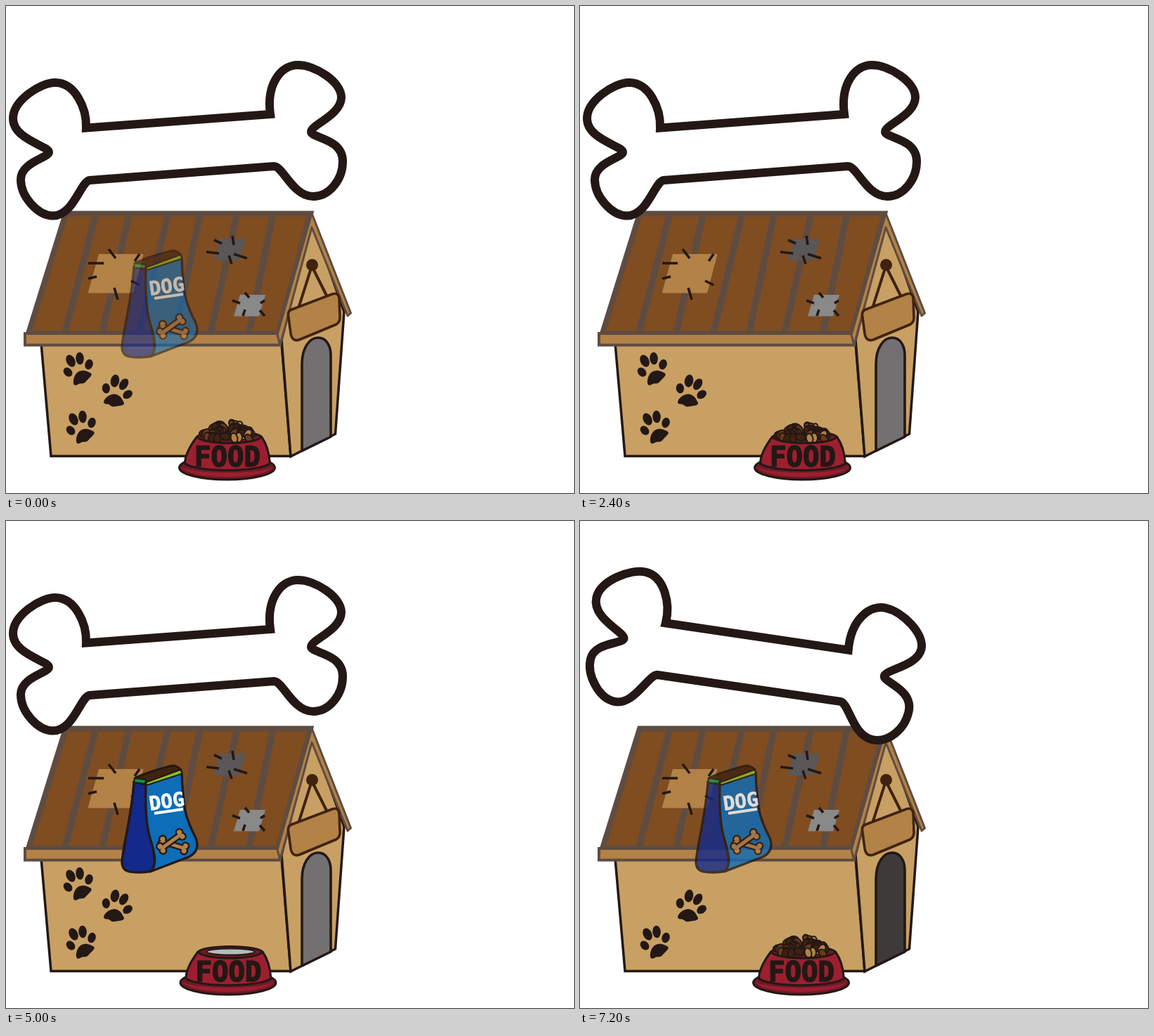
These frames come from a looping animation (808 px wide and 693 px high, 7400 ms). An HTML page with a canvas:

```html
<!DOCTYPE html>
<html lang="en">
<head>
<meta charset="utf-8">
<title>Dog house</title>
<style>
html, body { margin: 0; width: 100%; height: 100%; overflow: hidden; background: #fff; }
canvas { display: block; }
</style>
</head>
<body>
<canvas id="stage" width="808" height="693"></canvas>
<script>
const LOOP = 7400, W = 808, H = 693;
const INK = '#231815', WALL = '#c8a063', TAN = '#b28247', ROOF = '#804d21',
  TRIM = '#5f4c41', DARK = '#40220f', BROWN = '#6a3b1a', RED = '#9c1f30', WINE = '#6f1a25';
const stage = document.getElementById('stage').getContext('2d');
const layer = document.createElement('canvas');
layer.width = W;
layer.height = H;
const bagCtx = layer.getContext('2d');

function shape(c, d, fill, stroke, width = 3, join = 'round') {
  const p = new Path2D(d);
  c.lineJoin = join;
  c.lineCap = 'butt';
  if (fill) { c.fillStyle = fill; c.fill(p); }
  if (stroke) { c.strokeStyle = stroke; c.lineWidth = width; c.stroke(p); }
}

function oval(c, x, y, rx, ry, turn, fill, stroke, width = 3) {
  c.beginPath();
  c.ellipse(x, y, rx, ry, turn * Math.PI / 180, 0, 7);
  if (fill) { c.fillStyle = fill; c.fill(); }
  if (stroke) { c.strokeStyle = stroke; c.lineWidth = width; c.stroke(); }
}

function placed(c, x, y, turn, draw) {
  c.save();
  c.translate(x, y);
  c.rotate(turn * Math.PI / 180);
  draw();
  c.restore();
}

// Text centred on the current origin.
function label(c, text, size, colour, weight) {
  c.font = `bold ${size}px "DejaVu Sans Mono", "Noto Sans Mono", monospace`;
  c.textAlign = 'center';
  const m = c.measureText(text);
  const base = (m.actualBoundingBoxAscent - m.actualBoundingBoxDescent) / 2;
  c.fillStyle = c.strokeStyle = colour;
  c.lineWidth = weight;
  c.lineJoin = 'round';
  c.fillText(text, 0, base);
  c.strokeText(text, 0, base);
}

function seeded(seed) {
  return () => (seed = (seed * 16807) % 2147483647) / 2147483647;
}

function kibble(c, x, y, turn, colour) {
  oval(c, x, y, 7, 4.8, turn, colour, INK, 2);
}

function drawRoof(c) {
  shape(c, 'M83 296 H433 L387 467 H31 Z', ROOF);
  const planks = [[127.5, 83.5], [175, 136.5], [230.5, 189.5], [276, 240.5], [328.5, 291], [379.5, 345.5]];
  for (const [a, b] of planks) shape(c, `M${a} 297 L${b} 466`, null, TRIM, 9.5);
  shape(c, 'M85 295.500 H433 L387 466 H32 Z', null, TRIM, 8, 'miter');
  shape(c, 'M132 353 H195.500 L181 408.500 H116.500 Z', TAN);
  shape(c, 'M304 331 H341 L332 362 H296 Z', '#595757');
  shape(c, 'M333 411 H369 L360 441.500 H324 Z', '#898989');
  shape(c, `M146 346 L156 359 M190 353 L183 363 M117 366 H139 M117 388 L129 385
    M178 391 L190 397 M154 401 L159 418 M296 333 L307 338 M322 327 L324 340
    M285 350 L303 352 M317 355 L321 367 M324 353 L343 359 M340 408 L346 415
    M322 419 L333 423 M362 423 L368 419 M361 433 L368 441 M340 432 L337 441`, null, INK, 3.6);
}

function drawHouse(c, doorOpen) {
  shape(c, 'M50 480 H392 L405 640.500 H64 Z', WALL, INK, 3.5, 'miter');
  shape(c, 'M435 306 L481 435 L468.500 609 L405 641 L392 475 Z', WALL, INK, 3.5, 'miter');
  drawRoof(c);
  shape(c, 'M27 466 H387 L390 482.500 H27 Z', TAN, TRIM, 4, 'miter');
  shape(c, 'M435 295 L490.500 437 L486 441 L435 315 L390 482 L386 468 Z', TAN, TRIM, 3);
  shape(c, 'M435 370 L416 430 M435 370 L458 416', null, DARK, 4);
  oval(c, 435.5, 368.5, 8.5, 8.5, 0, DARK);
  shape(c, `M406 432 Q401 434 401.500 440 L405 466 Q407 478 417 475 L470 453
    Q475 450 475 443 L474 415 Q472 407 464 410 Z`, TAN, DARK, 3.6);
  shape(c, 'M421 633 V510 C421 486 432 472 444 472 C456 472 462 484 462 497 V613 Z',
    doorOpen ? '#3e3a39' : '#727071', INK, 3.6);
}

function paw(c, x, y, turn) {
  placed(c, x, y, turn, () => {
    oval(c, -17, 5, 5.6, 7.2, -42, INK);
    oval(c, -13, -11, 6.2, 9, -25, INK);
    oval(c, 0, -14.5, 5.8, 8.8, -4, INK);
    oval(c, 13, -6, 5.6, 7.4, 18, INK);
    shape(c, `M-9 21 C-10 14 -6 4 2 3 C9 2 11 5 15 6 C20 9 13 13 9 18
      C5 23 2 20 -2 22 C-5 24 -8 25 -9 21 Z`, INK);
  });
}

function drawPaws(c, phase) {
  if (phase === 0) paw(c, 105, 516, 0);
  if (phase !== 1) paw(c, 159, 550, 36);
  paw(c, 109, 599, 0);
}

const BONE = `M114 173.500 L376 154 C370 110 392 84 415 84 C440 84 477 108 477 130
  C477 155 434 169 434 179 C434 188 479 188 479 221 C479 247 460 271 437 271
  C408 271 394 228 381 228 L119 248 C106 250 96 298.500 67 298.500 C45 298.500 21 271 21 247
  C21 222 61 216 61 208 C61 199 10 190 10 160 C10 135 48 109 70 109
  C98 109 115 145 114 173.500 Z`;
const POSES = [[0, 0, 0], [1, 0, 12.65], [0, 0, 0], [-0.5, 0.3, -18.2]];

function drawBone(c, slot) {
  const [dx, dy, turn] = POSES[slot % 4];
  placed(c, 245 + dx, 190 + dy, turn, () => {
    c.translate(-245, -190);
    shape(c, BONE, '#fff', INK, 12, 'miter');
  });
}

function drawHeap(c, level) {
  const rnd = seeded(4711), bits = [];
  for (let i = 0; i < 44; i++) {
    const u = rnd() * 2 - 1, v = rnd();
    const tint = [DARK, DARK, BROWN, TAN][Math.floor(rnd() * 3 + (u > 0 ? 0.9 : 0.2))];
    bits.push([317 + u * 34, 619 - 25 * level * (1 - u * u * 0.55) * Math.sqrt(v), rnd() * 180, tint]);
  }
  bits.sort((a, b) => a[1] - b[1]);
  for (const b of bits) kibble(c, ...b);
}

const FALL = [[311, 533], [312, 546], [330, 550], [319, 554], [314, 563], [331, 562], [322, 568],
  [333, 569], [323, 579], [312, 580], [318, 589], [331, 589], [309, 592], [320, 601], [331, 600],
  [310, 604], [326, 610]];

function drawStream(c, count, step) {
  FALL.slice(0, count).forEach(([x, y], i) => {
    const j = i + step, tint = j * j % 5 < 2 ? (j % 2 ? BROWN : DARK) : TAN;
    kibble(c, x + (step % 2) * (i % 2 ? 3 : -2), y, j * 67 % 180, tint);
  });
}

function drawBowl(c, level, falling, step) {
  c.save();
  c.translate(level === 1 ? -1.5 : level > 0 ? 0.5 : 0, 0);
  oval(c, 316, 657, 68, 17, 0, WINE, INK, 3);
  shape(c, 'M250 655 C262 675 370 675 382 655 C370 667 262 667 250 655 Z', RED);
  oval(c, 319, 614, 46, 8.5, 0, WINE, INK, 3);
  oval(c, 319.5, 613, 34, 4.5, 0, '#b5bcbc', INK, 2);
  if (level) drawHeap(c, level);
  if (falling) drawStream(c, falling, step);
  shape(c, `M273 613 C264 625 256 638 256 651 C273 664 359 664 377 651
    C376 638 373 624 365 613 C357 625 281 625 273 613 Z`, RED, INK, 3);
  placed(c, 316.5, 640, 0, () => label(c, 'FOOD', 39, INK, 1.6));
  c.restore();
}

function smallBone(c, x, y, turn, half) {
  placed(c, x, y, turn, () => {
    for (const [grow, tint] of [[2.4, INK], [0, TAN]]) {
      c.fillStyle = tint;
      c.fillRect(-half, -2.4 - grow, half * 2, 4.8 + grow * 2);
      for (const sx of [-half, half])
        for (const sy of [-3.6, 3.6]) oval(c, sx, sy, 3.6 + grow, 3.6 + grow, 0, tint);
    }
  });
}

function drawBag(c) {
  shape(c, 'M183 366 C195 360 225 350 238 348 Q244 349 249 354 L200 374 Z', DARK, INK, 3);
  shape(c, `M182 371 C179 420 165 468 165 487 C166 499 176 500 189 500
    C200 500 210 498 212 494 C212 460 198 435 199 375 Z`, '#13298b', INK, 3.4);
  shape(c, `M199 374 L250 358 C252 412 256 424 270 451 C275 465 270 473 260 478
    L205 499 C218 489 209 466 204 448 C198 425 198 400 199 374 Z`, '#0d6db9', INK, 3.4);
  shape(c, 'M199 372 L248 354 Q251 357 249 360 L200 376 Z', '#8fc31f', INK, 2);
  shape(c, 'M183 366 L199 368 L198 374 L182 372 Z', '#109447', INK, 2);
  placed(c, 228.5, 398, -8, () => label(c, 'DOG', 28, '#fff', 0.6));
  shape(c, 'M211 416 L252 410', null, '#fff', 4);
  smallBone(c, 238, 461, 17, 17);
  smallBone(c, 235, 456, -36, 17);
}

function placeBag(c, alpha, tilt) {
  if (alpha <= 0) return;
  bagCtx.clearRect(0, 0, W, H);
  placed(bagCtx, 218 + 51 * tilt, 424 + 50.5 * tilt, 124 * tilt, () => {
    bagCtx.translate(-218, -424);
    drawBag(bagCtx);
  });
  c.globalAlpha = alpha;
  c.drawImage(layer, 0, 0);
  c.globalAlpha = 1;
}

function bagAlpha(k) {
  if (k < 3) return 0.6 - 0.2 * k;
  if (k < 10) return 0;
  return k < 25 ? Math.min(1, (k - 9) * 0.2) : 0.8;
}

function bagTilt(k) {
  if (k === 15 || k === 23) return 0.5;
  return k > 15 && k < 23 ? 1 : 0;
}

function foodLevel(k) {
  if (k < 6 || k > 21) return 1;
  if (k < 10) return [0.85, 0.6, 0.35, 0.15][k - 6];
  return k < 19 ? 0 : [0.35, 0.6, 0.85][k - 19];
}

function falling(k) {
  if (k < 16 || k > 21) return 0;
  return [4, 10][k - 16] || FALL.length;
}

function render(t) {
  const slot = Math.min(17, Math.floor(t / 400));
  const k = t < 4400 ? slot : 11 + Math.floor((t - 4400) / 200);
  const c = stage;
  c.fillStyle = '#fff';
  c.fillRect(0, 0, W, H);
  drawHouse(c, slot % 6 > 2);
  drawPaws(c, slot % 3);
  drawBone(c, slot);
  drawBowl(c, foodLevel(k), falling(k), k - 18);
  placeBag(c, bagAlpha(k), bagTilt(k));
}

const start = performance.now();
function tick() {
  render((performance.now() - start) % LOOP);
  requestAnimationFrame(tick);
}
tick();
</script>
</body>
</html>
```
